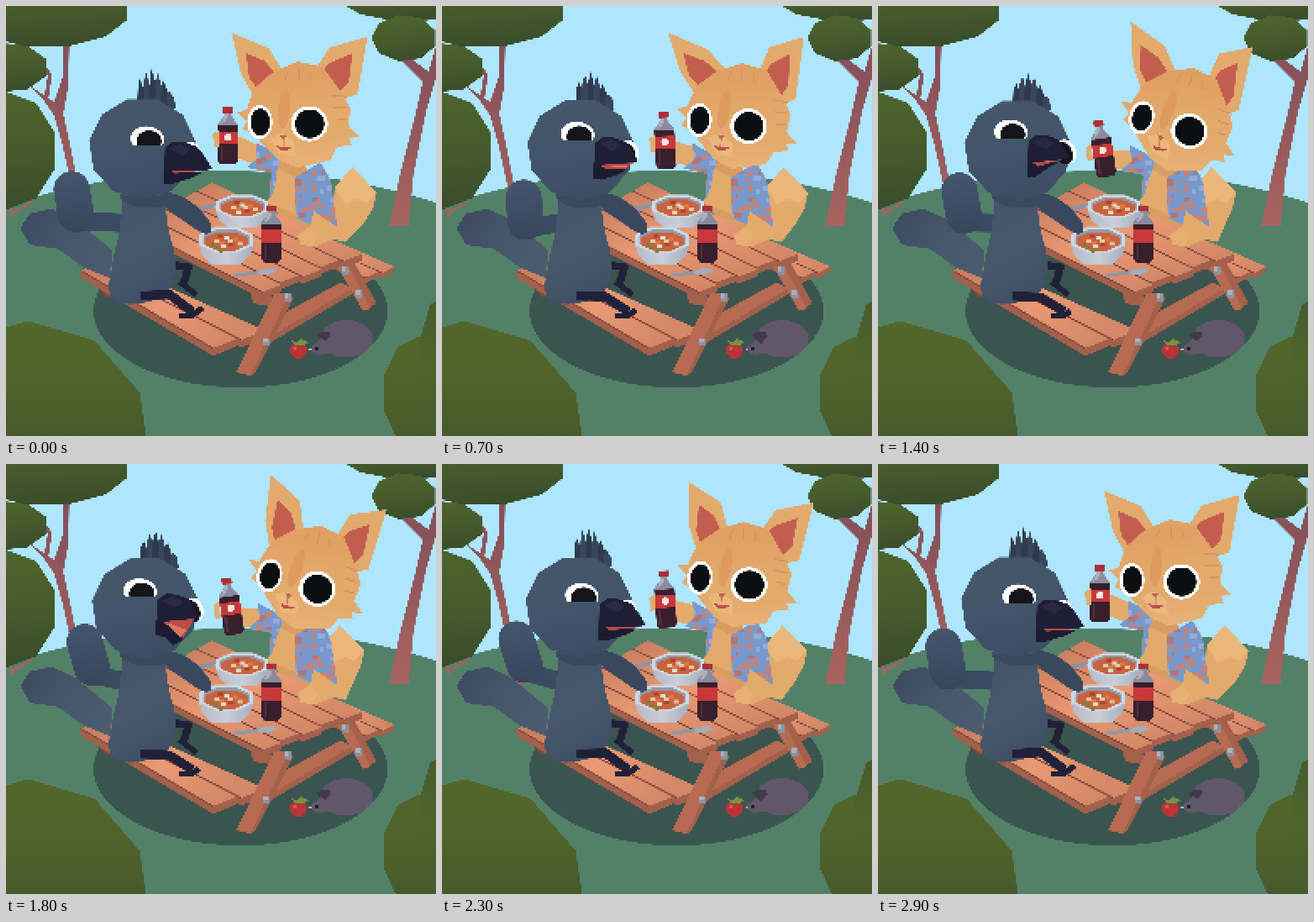
Recreate the animation shown at these times as an HTML page with a canvas. Size 512x512 px, loop 2.95 s.

```html
<!DOCTYPE html>
<html lang="en">
<head>
<meta charset="utf-8">
<title>Picnic</title>
<style>
html, body { margin: 0; width: 100%; height: 100%; overflow: hidden; background: #aee6ff; }
canvas { display: block; width: 100vw; height: 100vh; image-rendering: pixelated; }
</style>
</head>
<body>
<canvas id="stage" width="256" height="256"></canvas>
<script>
const LOOP = 2950, STEP = 50, TURN = Math.PI * 2;
const view = document.getElementById('stage').getContext('2d');
view.imageSmoothingEnabled = false;

// Scenes are painted large, then point-sampled so pixel edges stay hard.
function layer() {
  const c = document.createElement('canvas');
  c.width = c.height = 1024;
  const g = c.getContext('2d');
  g.scale(2, 2);
  return g;
}
const back = layer(), main = layer();
let g = back;

// ---------- drawing helpers ----------
const mix = (a, b, u) => a + (b - a) * u;
const shift = (p, dx, dy) => p.map((v, i) => v + (i % 2 ? dy : dx));
function path(p) {
  g.beginPath();
  for (let i = 0; i < p.length; i += 2) g.lineTo(p[i], p[i + 1]);
}
function poly(color, ...p) {
  path(p);
  g.fillStyle = color;
  g.fill();
}
function line(color, w, ...p) {
  path(p);
  g.strokeStyle = color;
  g.lineWidth = w;
  g.stroke();
}
function limb(color, w, ...p) {
  g.lineCap = 'round';
  line(color, w, ...p);
  g.lineCap = 'butt';
}
function blob(color, ...p) {
  const n = p.length;
  g.beginPath();
  for (let i = 0; i <= n; i += 2) {
    const x = p[i % n], y = p[(i + 1) % n];
    const mx = (x + p[(i + 2) % n]) / 2, my = (y + p[(i + 3) % n]) / 2;
    i ? g.quadraticCurveTo(x, y, mx, my) : g.moveTo(mx, my);
  }
  g.fillStyle = color;
  g.fill();
}
function oval(color, x, y, rx, ry, rot = 0) {
  g.beginPath();
  g.ellipse(x, y, rx, ry, rot, 0, 7);
  g.fillStyle = color;
  g.fill();
}
// Low-poly oval.
function gem(color, x, y, rx, ry, n, turn = .5) {
  const p = [];
  for (let i = 0; i < n; i++) {
    const a = (i + turn) / n * TURN;
    p.push(x + Math.cos(a) * rx * 1.03, y + Math.sin(a) * ry * 1.03);
  }
  poly(color, ...p);
}
function rect(color, x, y, w, h) {
  g.fillStyle = color;
  g.fillRect(x, y, w, h);
}
function fade(x0, y0, x1, y1, ...colors) {
  const f = g.createLinearGradient(x0, y0, x1, y1);
  colors.forEach((c, i) => f.addColorStop(i / (colors.length - 1), c));
  return f;
}
function random(seed) {
  return () => (seed = seed * 16807 % 2147483647) / 2147483647;
}

// ---------- motion ----------
const wave = t => (1 - Math.cos(TURN * t / LOOP)) / 2;
const ease = u => u * u * (3 - 2 * u);
function pose(t) {
  const broad = 1 - (1 - wave(t)) ** 3;
  return {
    lean: ease(wave(t - 50)),
    ears: wave(t - 320) ** 2,
    nod: ease(wave(t + 150)),
    talk: Math.cos(Math.PI * (t - 950) / 850) ** 2 * Math.sqrt(wave(t)),
    flap: Math.sin(TURN * t / LOOP),
    reach: broad,
    nibble: Math.sin(TURN * t / LOOP) ** 2
  };
}

// ---------- scenery ----------
function foliage(x, y, rx, ry, n) {
  gem(fade(x, y - ry, x + 6, y + ry, '#4e642d', '#465b2c', '#394d2b'), x, y, rx, ry, n);
}
function scenery() {
  rect('#aee6ff', 0, 0, 512, 512);
  oval('#538168', 262, 480, 500, 284);
  rect('#538168', 0, 400, 512, 112);

  const bark = fade(0, 60, 0, 262, '#85505a', '#a8645f');
  line(bark, 4, 4, 232, 8, 250);
  line(bark, 3, 8, 246, 32, 232);
  poly(bark, 82, 262, 98, 262, 86, 215, 76, 165, 68, 128, 74, 95, 75, 46, 67, 46,
    67, 85, 57, 114, 24, 92, 44, 111, 57, 130, 67, 165, 78, 215);
  line(bark, 5, 48, 108, 52, 82, 38, 64);
  poly(bark, 456, 262, 479, 262, 485, 200, 500, 125, 512, 84, 512, 46,
    503, 78, 484, 64, 466, 60, 496, 90, 487, 130, 469, 200);
  foliage(0, 172, 59, 68, 10);
  foliage(0, 73, 49, 29, 9);
  foliage(48, 4, 97, 44, 12);
  foliage(480, -10, 80, 27, 12);
  foliage(474, 38, 38, 27, 9);

  oval('#3a5450', 279, 363, 175, 91);
}
function bushes() {
  const leaf = fade(0, 380, 0, 512, '#53672b', '#50632b', '#475a2c');
  gem(leaf, 26, 521, 142, 142, 11, .25);
  gem(leaf, 492, 461, 43, 66, 10);
  gem(fade(490, 345, 512, 512, '#455a2c', '#50652c', '#455a2d'), 526, 426, 35, 84, 10);
}

// ---------- picnic table ----------
const WOOD = '#b76b52', WOOD_SIDE = '#a4604b', WOOD_DEEP = '#80493f';
// Boards run along a-b; d-c is the near edge.
function boards(a, b, c, d, n, thick) {
  const on = (p, q, u) => [mix(p[0], q[0], u), mix(p[1], q[1], u)];
  const top = fade(a[0], a[1], c[0], c[1], '#cb8060', '#ea9974', '#d48867');
  for (let i = 0; i < n; i++) {
    const u = i / n, v = (i + .95) / n, s = i % 2 ? 4 : 0;
    const quad = [...on(a, d, u), ...shift(on(b, c, u), -s, -s / 2),
      ...shift(on(b, c, v), -s, -s / 2), ...on(a, d, v)];
    poly(WOOD_SIDE, ...quad.slice(2), ...shift(quad.slice(6), 0, thick),
      ...shift(quad.slice(4, 6), 0, thick), ...shift(quad.slice(2, 4), 0, thick));
    poly(top, ...quad);
    line(WOOD_DEEP, 1.6, ...quad.slice(4));
  }
}
function bolt(x, y) {
  rect('#8994a6', x - 4, y - 4, 8, 9);
  rect('#a8b1c0', x - 4, y - 4, 5, 5);
}
function frame() {
  poly(WOOD_DEEP, 108, 328, 122, 332, 130, 342, 120, 347, 110, 338);
  poly(WOOD_SIDE, 398, 306, 414, 304, 441, 354, 425, 362);
  poly(WOOD, 394, 310, 406, 306, 434, 360, 425, 363);
  poly(WOOD, 306, 379, 398, 329, 412, 336, 314, 394);
  poly(WOOD_SIDE, 314, 394, 412, 336, 412, 343, 312, 402);
  boards([120, 302], [308, 386], [249, 410], [88, 315], 2, 9);
  poly(WOOD_SIDE, 291, 342, 317, 346, 312, 357, 294, 354);
  poly(WOOD, 320, 340, 337, 343, 291, 440, 274, 436);
  poly(WOOD_SIDE, 337, 343, 342, 348, 297, 436, 291, 440);
  bolt(310, 399);
  bolt(420, 342);
}
function tableTop() {
  boards([245, 210], [424, 295], [304, 341], [150, 263], 5, 8);
  bolt(335, 346);
  bolt(403, 314);
}
function bowl(x, y, rx, ry, depth) {
  poly(fade(x - rx, y, x + rx, y, '#b3bac7', '#c9cfd9', '#a4adbc'), x - rx, y, x + rx, y,
    x + rx * .85, y + depth * .6, x + rx * .5, y + depth, x - rx * .5, y + depth, x - rx * .85, y + depth * .6);
  gem('#d0d7df', x, y, rx, ry, 8);
  gem('#929bab', x, y, rx * .84, ry * .8, 8);
  gem('#c8633f', x, y + 2, rx * .78, ry * .72, 8);
  const tints = ['#e8c6a0', '#e07a45', '#d8e0d4', '#ad4433'];
  for (let i = 0; i < 9; i++) {
    const a = i * 2.4, r = .14 + i * .045;
    rect(tints[i % 4], x + Math.cos(a) * rx * r - 3, y + Math.sin(a) * ry * r, 6, 4);
  }
}
function soda(x, y, mark) {
  poly('#8b8ba0', x - 4, y + 6, x + 4, y + 6, x + 5, y + 12, x + 11, y + 20, x + 11, y + 28,
    x - 12, y + 28, x - 12, y + 20, x - 5, y + 12);
  poly('#adb0c2', x - 3, y + 8, x + 1, y + 8, x - 2, y + 16, x - 9, y + 21);
  rect('#ae2d38', x - 6, y, 12, 7);
  poly('#381f2c', x - 12, y + 22, x + 12, y + 22, x + 12, y + 64, x + 8, y + 68, x - 9, y + 68, x - 12, y + 64);
  rect('#52303c', x - 9, y + 46, 3, 18);
  rect('#c7383a', x - 12, y + 29, 24, 15);
  if (mark) oval('#f4e7e4', x, y + 36, 4.5, 4.5);
}
function meal() {
  line('#8b94a6', 5, 231, 241, 250, 237);
  bowl(281, 238, 33, 14, 26);
  bowl(262, 278, 34, 16, 30);
  for (let i = 0; i < 3; i++) rect('#6d8437', 243 + i * 5, 281 + i * 4, 4, 4);
  line('#8e98aa', 4, 272, 321, 304, 316);
  oval('#a3acbb', 311, 316, 11, 3.5, -.1);
  soda(316, 237, false);
}

// ---------- mouse ----------
function mouse(k) {
  gem('#62576a', 405, 396, 31, 22, 11);
  poly('#62576a', 360, 408, 382, 391, 392, 414, 370, 415);
  poly('#413a49', 369, 392 - k * 2, 376, 388, 385, 387 + k, 387, 392 + k, 380, 398 + k * 4, 372, 395);
  rect('#27222d', 367, 406, 4, 3);
  rect('#d6a3a5', 360 + k, 407, 3, 3);
  gem('#b93337', 348, 410, 10, 10, 8);
  rect('#d45650', 342, 405, 4, 4);
  poly('#76933f', 339, 398, 347, 400, 351, 396, 360, 400, 354, 404, 344, 404);
}

// ---------- bird ----------
const NAVY = '#202139';
function birdBody({ nod, flap, reach }) {
  poly(fade(20, 250, 120, 310, '#3d4a61', '#46566b', '#4c5c70'), 17, 264, 28, 247, 54, 241, 82, 254,
    126, 290, 124, 324, 92, 311, 62, 289, 28, 284);

  // raised wing
  const ex = 83 + 19 * reach, ey = 248 + 9 * flap;
  const hx = 78 + 18 * reach + 4 * flap, hy = 218 + 10 * flap;
  limb('#3b4a60', 22, 138, 258, ex, ey + 8);
  limb(fade(hx, hy - 25, ex, ey + 25, '#46566d', '#37455b'), 43, ex, ey, hx, hy);

  // legs, body, near wing, collar
  line(NAVY, 9, 198, 308, 217, 311, 211, 331);
  line(NAVY, 7, 206, 328, 227, 344);
  blob(fade(130, 230, 195, 350, '#44546a', '#47586c', '#3e4d64'), 138, 214, 184, 214, 190, 240, 193, 268,
    204, 305, 198, 335, 182, 350, 140, 357, 120, 345, 126, 305, 137, 262);
  blob('#3a485e', 183, 218, 218, 229, 242, 254, 246, 268, 236, 273, 212, 256, 186, 239);
  line(NAVY, 11, 160, 345, 194, 343 + nod * 4, 222, 364);
  line(NAVY, 7, 206, 369, 222, 368, 234 - nod * 5, 359 + nod * 4);
  blob('#3b495f', 130, 222, 152, 228, 190, 224, 204, 230, 184, 241, 146, 239);
}
function birdHead({ nod, talk }) {
  const x = 4 * nod, y = 2 * nod;
  for (let i = 0; i < 6; i++) {
    const fx = 161 + i * 7 + x, tall = 22 + 22 * Math.sin((i + .8) * .58);
    poly(i % 2 ? '#394559' : '#2f3a50', fx - 5, 122 + y, fx - 4, 116 - tall * .6 + y,
      fx - 2 + nod * 2, 118 - tall + y * 3, fx + 4, 118 - tall * .5 + y, fx + 6, 122 + y);
  }
  gem(fade(140, 112, 165, 228, '#46576a', '#43556a', '#3d4d64'), 162 + x, 169 + y, 62, 59, 11, .75);

  const fx = -10 * nod, fy = -8 * nod;
  // far eye, mostly behind the beak
  oval('#fff', 222 + nod * 2, 173, 9 + nod * 2, 12 + nod * 3, -.4);
  oval('#15151b', 219 + nod * 2, 175, 8 + nod * 2, 11 + nod * 3, -.4);
  // near eye with a flat lower lid
  g.save();
  g.beginPath();
  g.rect(140 + fx, 130 + fy, 52, 35);
  g.clip();
  oval('#fff', 168 + fx, 158 + fy, 20, 15, .1);
  oval('#14141a', 170 + fx, 161 + fy, 15, 13);
  g.restore();

  const bx = 245 - 18 * nod, by = 193 - 13 * nod;
  const jx = bx - 11 - 8 * talk, jy = by + 5 + 24 * talk;
  const cx = 189 + fx, cy = 194 + fy;
  poly('#1c1b32', cx - 2, cy - 2, cx + 12, cy, jx, jy, jx - 12, jy + 6, cx + 7, cy + 18, cx - 2, cy + 17);
  poly('#b94c49', cx + 3, cy - 1, bx - 5, by + 2, jx - 1, jy - 2, cx + 12, cy + 5);
  poly('#dd7861', cx + 10, cy + 1, mix(bx, jx, .55) - 5, mix(by, jy, .55), jx - 4, jy - 3);
  poly('#201e37', cx - 1, cy + 1, cx, cy - 26, cx + 10, cy - 33, cx + 22, cy - 32,
    mix(222 + fx, bx, .2), 167 + fy, mix(222 + fx, bx, .6), mix(168 + fy, by, .4), bx, by, bx - 5, by + 2);
  poly('#2b2945', cx + 5, cy - 25, cx + 19, cy - 30, cx + 30, cy - 23, cx + 21, cy - 16);
}

// ---------- cat ----------
const FUR = '#e3aa6d', FUR_DARK = '#d6965e', FUR_LIGHT = '#ebb77b', PINK = '#c35e4f';
function shirt(...p) {
  const rnd = random(11), tints = ['#b9736d', '#c98271', '#93acd8'];
  g.save();
  path(p);
  g.clip();
  rect('#7998cb', 270, 150, 140, 130);
  for (let y = 158; y < 272; y += 11)
    for (let x = 282; x < 396; x += 11)
      rect(tints[Math.floor(rnd() * 3)], x + rnd() * 6, y + rnd() * 6, 3 + rnd() * 6, 3 + rnd() * 5);
  g.restore();
}
function catBody({ lean }) {
  const d = -15 * lean, y = 16 * lean;
  const tip = shift([391, 216, 412, 192, 427, 207, 441, 222], d, 0);
  poly(FUR, ...tip, 437 + d, 240, 426 + d * .8, 258, 404, 281, 384, 276, 390, 240);
  poly(FUR_LIGHT, ...tip, 430 + d, 234, 418 + d, 230, 404 + d, 236);
  poly('#d99d62', 318, 180, 352, 182, 364, 205, 364, 285, 312, 236);
  poly(FUR, 320, 192, 345, 204, 350, 250, 312, 234);
  shirt(344, 204, 374, 186, 386, 206, 394, 262, 378, 268, 345, 252);
  shirt(316, 190, 323, 192, 320, 215, 313, 232);
  poly(FUR, 268, 160 + y, 277, 155 + y, 304, 167 + y * .3, 299, 190 + y * .3, 274, 180 + y * .9);
  shirt(...shift([297, 162, 328, 179, 321, 200, 287, 192, 299, 181], y / 6, y / 5));
}
function catArm() {
  poly(FUR, 366, 244, 394, 263, 393, 276, 366, 287, 350, 283, 347, 273, 362, 262);
  poly('#e7b073', 347, 273, 362, 262, 370, 274, 366, 287, 350, 283);
}
function drink({ lean }) {
  g.save();
  g.translate(264 - 2 * lean, 120 + 16 * lean);
  g.rotate(-.15 * lean);
  soda(0, 0, true);
  g.restore();
  poly(FUR, ...shift([246, 152, 253, 148, 254, 167, 248, 168], lean, 16 * lean));
}
function eye(x, y, rx, ry, edge) {
  oval('#fff', x, y, rx, ry);
  oval('#0d0e12', x + .5, y, rx - edge, ry - 4);
}
function catHead({ lean, ears }) {
  const PX = 345, PY = 185, a = .245 * lean, co = Math.cos(a), si = Math.sin(a);
  const ox = PX - lean, oy = PY + 3.5 * lean;
  const place = (x, y) => [ox + (x - PX) * co - (y - PY) * si, oy + (x - PX) * si + (y - PY) * co];
  // Ears trail the head: each point [x, y, pull] follows the late tip by its pull.
  function ear(x, y, dx, dy, ...parts) {
    const [hx, hy] = place(x, y);
    const lagX = x + dx * ears - hx, lagY = y + dy * ears - hy;
    parts.forEach((pts, i) => poly(i ? PINK : FUR, ...pts.flatMap(([px, py, pull]) => {
      const q = place(px, py);
      return [q[0] + lagX * pull, q[1] + lagY * pull];
    })));
  }
  ear(268, 32, 47, -20,
    [[268, 32, 1], [312, 50, .6], [328, 75, 0], [296, 110, 0], [279, 80, .4]],
    [[285, 56, .75], [307, 65, .4], [321, 80, 0], [300, 100, 0], [289, 85, .3]]);
  ear(430, 36, 23, 18,
    [[430, 36, 1], [385, 49, .6], [367, 77, 0], [396, 112, 0], [418, 105, .3]],
    [[412, 56, .75], [386, 67, .4], [374, 78, 0], [396, 102, 0], [408, 90, .3]]);

  g.save();
  g.translate(ox, oy);
  g.rotate(a);
  g.translate(-PX, -PY);
  poly(fade(335, 66, 350, 190, '#e0a064', '#e2a267', FUR, FUR, '#e8b276'), 318, 78, 347, 66, 377, 72, 400, 104,
    410, 122, 407, 143, 421, 156, 408, 157, 411, 165, 394, 168, 386, 183, 366, 188, 346, 192,
    324, 183, 306, 165, 296, 153, 281, 146, 287, 137, 274, 126, 286, 124, 295, 98);
  for (let i = 0; i < 3; i++) {
    line(FUR_DARK, 2, 335 + i * 13, 77 - i % 2 * 4, 332 + i * 16, 88);
    line(FUR_DARK, 2, 387 + i * 3, 106 + i * 14, 405, 108 + i * 13);
  }
  oval('#df9a62', 331, 122, 7, 24, .1);
  poly(FUR_LIGHT, 314, 158, 328, 151, 344, 162, 345, 179, 325, 176);
  eye(302, 138, 15, 20, 3.5);
  eye(361, 140, 22, 21, 4.5);
  poly('#bf6553', 325, 153, 334, 154, 330, 160);
  line('#c07a58', 1.5, 330, 160, 330, 167);
  poly('#b9504a', 321, 166, 330, 168, 341, 167, 336, 171, 328, 172);
  g.restore();
}

// ---------- playback ----------
scenery();
boards([370, 270], [462, 310], [432, 326], [340, 286], 2, 6);
g = main;
let shown = -1;
function paint(t) {
  const s = pose(t);
  g.drawImage(back.canvas, 0, 0, 512, 512);
  catBody(s);
  frame();
  tableTop();
  mouse(s.nibble);
  meal();
  catArm();
  birdBody(s);
  drink(s);
  catHead(s);
  birdHead(s);
  bushes();
  view.drawImage(main.canvas, 0, 0, 256, 256);
}
const start = performance.now();
function tick() {
  const t = Math.floor((performance.now() - start) % LOOP / STEP) * STEP;
  if (t !== shown) paint(shown = t);
  requestAnimationFrame(tick);
}
tick();
</script>
</body>
</html>
```
